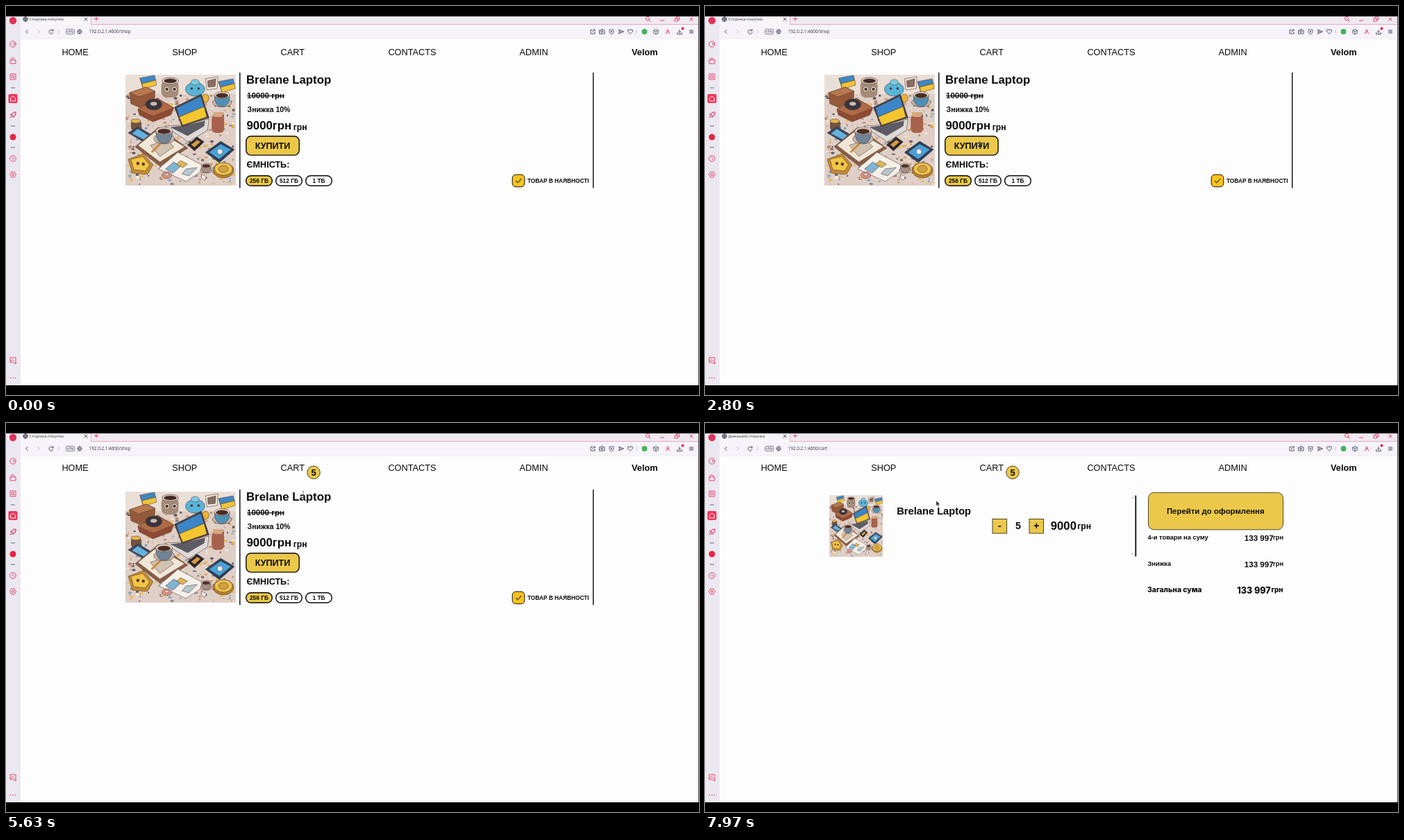
An HTML page that plays this animation: 998x561 px, repeating every 8000 ms.

```html
<!DOCTYPE html>
<html lang="uk">
<head>
<meta charset="utf-8">
<title>Shop</title>
<style>
  html, body { margin: 0; width: 100%; height: 100%; overflow: hidden; background: #000; }
  svg { display: block; width: 100vw; height: 100vh; }
  text { font-family: "Liberation Sans", Arial, sans-serif; fill: #0b0b0b; }
  .b { font-weight: 700; }
  .ui { font-family: "Open Sans", "Noto Sans", sans-serif; fill: #34343f; }
  .black { font-family: Inter, "Liberation Sans", sans-serif; font-weight: 800; }
  .mid { text-anchor: middle; }
  .red { stroke: #e0345a; fill: none; }
  .ink { stroke: #3f4257; fill: none; }
</style>
</head>
<body>
<svg id="stage" viewBox="0 0 998 561"></svg>
<script>
const LOOP = 8000;
const GOLD = '#ebc849';
const PRODUCT = 'Brelane Laptop';
const HOST = '192.0.2.1:4600';

const clicks = [2950, 3500, 4000, 4450, 4850];
const NAVIGATE = 6850, CART_SHOWN = 7000, LOADED = 7250;

// time, x, y
const path = [
  [1100, 470, 537], [1700, 440, 258], [2300, 396, 199], [4950, 396, 199],
  [5600, 428, 103], [5950, 428, 103], [6450, 421, 63], [7500, 421, 63], [7970, 333, 112]
];

const text = (x, y, size, str, cls = 'b', extra = '') =>
  `<text x="${x}" y="${y}" font-size="${size}" class="${cls}" ${extra}>${str}</text>`;
const rect = (x, y, w, h, fill, r = 0, stroke = 'none', sw = 1) =>
  `<rect x="${x}" y="${y}" width="${w}" height="${h}" rx="${r}" fill="${fill}" stroke="${stroke}" stroke-width="${sw}"/>`;
const circle = (x, y, r, fill, extra = '') => `<circle cx="${x}" cy="${y}" r="${r}" fill="${fill}" ${extra}/>`;
const oval = (x, y, rx, ry, fill) => `<ellipse cx="${x}" cy="${y}" rx="${rx}" ry="${ry}" fill="${fill}"/>`;
const poly = (points, fill) => `<polygon points="${points}" fill="${fill}"/>`;
const icon = (x, y, d, cls = 'ink', w = .9) =>
  `<path transform="translate(${x} ${y})" d="${d}" class="${cls}" stroke-width="${w}"/>`;
const ring = r => `M${-r} 0a${r} ${r} 0 1 0 ${2 * r} 0a${r} ${r} 0 1 0 ${-2 * r} 0`;
const box = r => `M${-r} ${-r}h${2 * r}v${2 * r}h${-2 * r}z`;
const CROSS = 'M-2.5 -2.5l5 5m0 -5l-5 5';
const GLOBE = ring(3.2) + 'M-3.2 0h6.4M0 -3.2q-3 3.2 0 6.4q3 -3.2 0 -6.4';

function clutter() {
  let seed = 11;
  const rnd = () => (seed = seed * 16807 % 2147483647) / 2147483647;
  const tones = ['#b98a6a', '#8a6a5c', '#d9a15e', '#7ea3bd', '#d8a49a', '#e8bd45', '#f2e6da', '#5c5560'];
  let out = '';
  for (let i = 0; i < 420; i++) {
    const y = 28 + rnd() * 130;
    out += oval((2 + rnd() * 156).toFixed(1), y.toFixed(1), (.8 + rnd() * 2).toFixed(1), (.7 + rnd() * 1.5).toFixed(1),
      tones[Math.floor(rnd() * tones.length)]);
  }
  return out;
}

const cup = (x, y, s, body) =>
  oval(x, y + s * .55, s * 1.25, s * .6, '#c5b8b0') +
  `<path d="M${x - s} ${y - s * .4}q0 ${s * 1.5} ${s} ${s * 1.5}q${s} 0 ${s} ${-s * 1.5}z" fill="${body}"/>` +
  oval(x, y - s * .4, s, s * .45, '#efe2d5') + oval(x, y - s * .35, s * .78, s * .3, '#4a2c22');

const flag = (x, y) =>
  `<path d="M${x} ${y + 2}l7 22" stroke="#8b6a50" stroke-width="1.2"/>` +
  poly(`${x},${y + 2} ${x + 21},${y - 2} ${x + 23},${y + 5} ${x + 3},${y + 10}`, '#3d87c4') +
  poly(`${x + 3},${y + 10} ${x + 23},${y + 5} ${x + 24},${y + 12} ${x + 5},${y + 18}`, '#f2c437');

const picture = `<symbol id="picture" viewBox="0 0 160 160" preserveAspectRatio="none">
  ${rect(0, 0, 160, 160, '#dfcfc7')}${rect(0, 0, 160, 28, '#eadfd6')}${clutter()}
  <g stroke="#5a4038" stroke-width=".6">
  ${flag(21, 3)}${flag(135, 8)}
  ${poly('6,26 30,18 43,24 42,38 20,47 8,42', '#94593a')}${poly('6,26 30,18 43,24 20,32', '#b8784d')}
  ${poly('18,50 46,34 70,48 66,58 40,68 20,58', '#8f4a32')}${poly('18,50 46,34 70,48 40,60', '#b06a46')}
  ${oval(41, 43, 12, 8, '#37343d')}${oval(41, 42, 5, 3, '#c9bdb0')}
  ${rect(52, 8, 25, 25, '#a58b78', 8)}${oval(65, 9, 12, 5, '#dccdbf')}${oval(65, 9, 9, 3, '#3f2a25')}
  ${circle(60, 21, 4, '#f0e2cf')}${circle(71, 21, 4, '#f0e2cf')}${circle(60, 21, 2, '#3a3437')}${circle(71, 21, 2, '#3a3437')}
  ${oval(101, 21, 14, 10, '#58b4d8')}${oval(101, 11, 6, 4, '#7bcbe6')}${circle(96, 20, 1.5, '#26343c')}${circle(106, 20, 1.5, '#26343c')}
  ${poly('116,6 134,3 133,20 118,22', '#efe8de')}${poly('119,9 131,6 130,17 120,18', '#876e60')}
  ${oval(116, 34, 5, 6, '#e8b437')}${cup(140, 34, 11, '#4f91b5')}
  ${rect(125, 58, 18, 26, '#a8614c', 6)}${rect(127, 54, 14, 7, '#d7a77d', 3)}
  ${rect(8, 66, 15, 15, '#715344', 5)}${oval(15, 67, 7, 3, '#e7b548')}
  ${poly('57,74 80,73 121,64 119,80 91,97', '#dedad8')}${poly('66,76 83,74 115,67 114,74 90,88', '#5c5c66')}
  ${poly('71,47 110,28 121,62 82,75', '#3a3b45')}${poly('74,48 109,31 114,46 78,61', '#3a86c8')}
  ${poly('78,61 114,46 118,61 83,73', '#f3c62f')}
  ${poly('4,84 18,75 40,88 28,98', '#33435c')}${poly('9,85 18,78 34,88 27,94', '#63b2df')}
  ${poly('14,104 48,76 90,106 50,132', '#8a5d43')}${poly('18,102 46,80 86,104 50,126', '#f1e7d8')}
  ${poly('36,102 60,94 70,104 50,118', '#d2c2b1')}<path d="M38 112l16 -16" stroke="#c98a3b" stroke-width="3"/>
  ${cup(56, 86, 12, '#6f8595')}
  ${poly('90,101 104,90 114,97 100,110', '#25252c')}${poly('95,101 104,94 109,97 100,105', '#d79843')}
  ${poly('116,112 138,96 158,108 136,127', '#29405c')}${poly('121,112 138,100 153,108 136,122', '#46a3dc')}${circle(137, 111, 4, '#e9edf0')}
  ${poly('48,136 76,112 118,134 88,154', '#f5f1ea')}${poly('58,136 70,126 80,132 69,142', '#7eb4d5')}
  ${poly('80,124 90,129 83,134 74,129', '#ddb554')}${poly('88,136 104,134 92,146 82,143', '#b7c6cf')}
  ${poly('4,122 26,114 40,130 32,144 10,142', '#c48b34')}${poly('8,122 25,118 35,130 29,139 12,137', '#f2c546')}
  ${circle(18, 128, 2, '#4d3324')}${circle(26, 129, 2, '#4d3324')}
  ${oval(60, 145, 7, 5, '#dd9089')}${oval(60, 144, 3, 2, '#f0d8cb')}
  ${cup(117, 134, 7, '#a59085')}${oval(142, 138, 15, 11, '#b57f2c')}${oval(142, 136, 13, 9, '#efc54b')}${oval(142, 136, 7, 5, '#d3a240')}
  ${poly('110,144 117,147 115,152 111,150', '#fff')}
  </g>
</symbol>`;

const sidebar = rect(0, 14, 21, 533, '#ebe8f1') +
  circle(10, 21, 5.2, '#e0345a') +
  icon(10, 55, ring(4.2) + 'M0 0l2 -2M0 0h4', 'red') +
  icon(10, 79, 'M-4 -1h8v5h-8zM-3 -1l1 -3h3l2 3', 'red') +
  icon(10, 102, box(4) + 'M-1.7 -1.7h3.4v3.4h-3.4z', 'red') +
  [118, 173, 204].map(y => icon(10, y, 'M-3 0h6', 'ink', .8)).join('') +
  rect(3.5, 127, 13, 13, '#ee3659', 2) +
  `<path d="M6.5 137v-4l3.500 -3l3.500 3v4z" fill="none" stroke="#fff" stroke-width=".9"/>` +
  icon(10, 157, 'M4 -4q-5 0 -6 5l1.500 1.500q5 -1 4.500 -6.500zM-2 -1l-2 1M1 2l-1 2M-4 4l1.500 -1.500', 'red', 1.1) +
  circle(10, 189, 4.5, '#e5253f') +
  icon(10, 220, ring(4.3) + 'M0 -2.500v2.500l2 1.500', 'red') +
  icon(10, 243, 'M-2 -4h4l2.500 4l-2.500 4h-4l-2.500 -4z' + ring(1.5), 'red') +
  icon(10, 511, 'M-4 -4h8v6M-4 -4v7h5M-4 2l3 -3l3 2M1 4h4m-2 -2l2 2l-2 1.500', 'red') +
  [6.5, 10, 13.5].map(x => circle(x, 536.5, .8, '#e0345a')).join('');

const browser = rect(0, 14, 998, 533, '#fdfdfd') +
  rect(21, 14, 977, 13, '#f0e9f1') + rect(21, 14, 101, 13, '#f8f5fa') + rect(21, 27, 977, 20, '#f6f3fa') +
  `<path d="M122.500 14v12.500H998M20.500 14v533" fill="none" stroke="#e59aad" stroke-width=".8"/>
   <path d="M21 47.300h977" stroke="#e7e3ec" stroke-width=".6"/>` + sidebar +
  icon(115, 19, CROSS) + icon(130, 18.5, 'M-3 0h6M0 -3v6', 'red') +
  icon(924, 18, ring(2.6) + 'M2 2l2.500 3', 'red') + icon(945, 21, 'M-3 0h6', 'red') +
  icon(966, 19, 'M-3 -1h4.500v4h-4.500zM-1 -1v-2h4.500v4h-2', 'red') + icon(987, 19, CROSS, 'red') +
  icon(30, 37, 'M1.500 -3l-3 3l3 3') + `<g opacity=".3">${icon(47, 37, 'M-1.500 -3l3 3l-3 3')}${icon(76, 37, 'M0 -2.500v5')}${icon(908, 37, 'M0 -2.500v5')}</g>` +
  rect(86.5, 33.5, 12, 7, 'none', 1, '#55586b', .7) + text(92.5, 39, 4.8, 'VPN', 'ui mid') +
  icon(106, 37, GLOBE, 'ink', .7) +
  icon(845, 37, 'M0 -2.500h-3v5.500h6v-3M-1 1l4 -4M1 -3h2v2') +
  icon(858, 37, 'M-3.500 -2h2l1 -1.500h2l.5 1.500h2v5h-7.500z' + ring(1.3)) +
  icon(872, 37, 'M-3 -3h6v4q-1 2 -3 3q-2 -1 -3 -3zM-1.300 -1.300l2.600 2.600m0 -2.600l-2.600 2.600', 'ink', .8) +
  icon(886, 37, 'M-3.500 -3l7 3l-7 3l1 -3zM-2.500 0h3') +
  icon(899, 37, 'M0 3.300l-3.300 -3.300q-1 -3 1.300 -3.200q1.500 0 2 1.400q.5 -1.400 2 -1.400q2.300 .2 1.300 3.200z') +
  circle(919.5, 37, 4, '#45b35d') +
  icon(936, 37, 'M0 -3.500l3.300 1.700v4l-3.300 1.600l-3.300 -1.600v-4zM-3.300 -1.800l3.300 1.700l3.300 -1.700M0 0v3.500', 'ink', .8) +
  icon(953, 37, 'M-1.400 -1.500a1.400 1.400 0 1 0 2.800 0a1.400 1.400 0 1 0 -2.800 0M-2.700 3.300q0 -3 2.700 -3q2.700 0 2.700 3', 'red') +
  icon(970, 37, 'M0 -3v4.500m-2 -2l2 2l2 -2M-3.300 1v2.500h6.600v-2.500') + circle(974.5, 32.5, 2, '#e8273f') +
  icon(987, 37, 'M-3 -2h6M-3 0h6M-3 2h6') +
  rect(997, 14, 1, 533, '#5a4750');

const nav = [[80.4, 'HOME'], [239.2, 'SHOP'], [395.6, 'CART'], [550.4, 'CONTACTS'], [739.5, 'ADMIN']]
  .map(([x, s]) => text(x, 70.6, 12.75, s, '')).join('') + text(901, 70.6, 12.75, 'Velom');

const pill = (x, label, fill) =>
  rect(x + .7, 244.7, 37.6, 14.6, fill, 7.3, '#0b0b0b', 1.4) + text(x + 19.5, 254.7, 8.4, label, 'b mid');
const rule = (x, y1, y2, w) => `<path d="M${x} ${y1}V${y2}" stroke="#0b0b0b" stroke-width="${w}"/>`;

const shop = `<use href="#picture" x="172" y="99" width="159" height="160"/>` +
  rule(336.8, 96, 262.5, 1.4) + rule(845.7, 96, 262.5, 1.4) +
  text(346, 112, 16.8, PRODUCT) +
  text(347, 133, 11.5, '10000 грн', 'b', 'text-decoration="line-through"') +
  text(347.6, 153, 10.5, 'Знижка 10%') +
  text(346.5, 178, 16.8, '9000грн') + text(413.7, 179, 12.2, 'грн') +
  rect(345.8, 187.7, 76.4, 27.4, GOLD, 7, '#0b0b0b', 1.4) + text(384, 206, 12.6, 'КУПИТИ', 'b mid') +
  text(346.6, 233, 12.6, 'ЄМНІСТЬ:') +
  pill(345, '256 ГБ', GOLD) + pill(388, '512 ГБ', '#fdfdfd') + pill(431, '1 ТБ', '#fdfdfd') +
  rect(729.2, 243.2, 17.6, 17.6, '#fcc419', 5, '#0b0b0b', 1) +
  icon(738, 252, 'M-4 0l2.800 2.800l5.500 -5.800', 'ink', 1.2) +
  text(751, 254.6, 8.3, 'ТОВАР В НАЯВНОСТІ');

const stepper = (x, s) => rect(x, 138.5, 20.6, 20.6, GOLD, 0, '#3a3420', .9) + text(x + 10.3, 153.3, 14, s, 'b mid');
const sumRow = (y, label) => text(637.4, y, 9.35, label) +
  text(776.8, y + 1.5, 11.6, '133 997') + text(818, y, 9.3, 'грн');

const cart = `<use href="#picture" x="179" y="104" width="77.500" height="89"/>` +
  text(276.2, 132, 14.7, PRODUCT) + stepper(414, '-') + text(451, 153.3, 14.4, '5', 'b mid') + stepper(467, '+') +
  text(497.8, 154, 16.7, '9000') + text(536.2, 153, 12.2, 'грн') +
  rule(620.3, 104.5, 192.5, 1.8) +
  `<path d="M614 108.500l1.800 -2l1.800 2M614 188l1.800 2l1.800 -2" fill="none" stroke="#aaa" stroke-width=".9"/>` +
  rect(638.5, 100.4, 194, 53.4, GOLD, 8, '#3a3420', .9) +
  text(735.3, 130.5, 11.4, 'Перейти до оформлення', 'b mid') +
  sumRow(168, '4-и товари на суму') + sumRow(206, 'Знижка') +
  text(637, 244, 10.4, 'Загальна сума', 'black') + text(766.3, 246, 12.5, '133 997', 'black') +
  text(815.5, 244, 9.7, 'грн', 'black');

const pointers = {
  arrow: '<path d="M0 0v7.500l1.800 -1.600l1.300 2.600l1.200 -.6l-1.200 -2.500h2.400z" fill="#22242b" stroke="#fff" stroke-width=".4"/>',
  hand: '<path d="M-1.500 -3.500q1 -1 1.600 0v2.500l3.400 .9v3l-1.300 2.600h-3.200l-2.800 -3.600q.4 -1.200 1.500 -.4l.8 .7z" fill="#2b3038" stroke="#d9dde2" stroke-width=".4"/>',
  beam: '<path d="M-1.500 -4.500h3M0 -4.500v9M-1.500 4.500h3" fill="none" stroke="#6d7480" stroke-width=".8"/>'
};

const $ = id => document.getElementById(id);
$('stage').innerHTML = `<defs>${picture}</defs>${browser}
  <g id="globe">${icon(28, 19, GLOBE, 'ink', 1)}</g>
  <g id="spinner"><path d="M28 16a3 3 0 1 1 -3 3" fill="none" stroke="#777a88" stroke-width=".8"/></g>
  ${text(33.6, 21.2, 5.85, '', 'ui', 'id="tab"')}
  <g id="reload">${icon(65, 37, 'M2.600 -1.500a3 3 0 1 0 .4 2.300M3 -3.500v2.300h-2.300')}</g>
  <g id="stop">${icon(65, 37, CROSS)}</g>
  ${text(119.6, 39.3, 6.35, '', 'ui', 'id="address"')}
  <g id="nav">${nav}</g><g id="shop">${shop}</g><g id="cart">${cart}</g>
  <g id="badge">${circle(443, 71.3, 9.3, GOLD, 'stroke="#3a3420" stroke-width=".9"')}${text(443, 76, 13, '', 'b mid', 'id="count"')}</g>
  <g id="pointer">${Object.entries(pointers).map(([k, v]) => `<g id="${k}">${v}</g>`).join('')}</g>
  ${rect(0, 0, 998, 15, '#000')}${rect(0, 547, 998, 14, '#000')}`;

const show = (id, on) => { $(id).style.display = on ? '' : 'none'; };

function pointerAt(t) {
  const i = path.findIndex(p => p[0] > t);
  if (i === 0) return null;
  if (i < 0) return path[path.length - 1].slice(1);
  const [t0, x0, y0] = path[i - 1], [t1, x1, y1] = path[i];
  const u = (t - t0) / (t1 - t0), e = u * u * (3 - 2 * u);
  return [x0 + (x1 - x0) * e, y0 + (y1 - y0) * e];
}

function pointerKind(x, y, inCart) {
  if (y < 72) return 'hand';
  if (inCart) return 'arrow';
  if (y > 187 && y < 216 && x > 345 && x < 423) return 'hand';
  return y > 96 && y < 116 ? 'beam' : 'arrow';
}

function render(t) {
  const count = clicks.filter(c => c <= t).length;
  const inCart = t >= CART_SHOWN, loading = t >= NAVIGATE && t < LOADED;
  show('shop', !inCart);
  show('cart', inCart);
  show('badge', count > 0);
  $('count').textContent = count || '';
  $('nav').setAttribute('transform', `translate(0 ${count ? -2 : 0})`);

  show('globe', !loading);
  show('spinner', loading);
  show('reload', !loading);
  show('stop', loading);
  $('spinner').setAttribute('transform', `rotate(${t * .36} 28 19)`);
  $('tab').textContent = t >= LOADED ? 'Домашня сторінка' : inCart ? HOST + '/cart' : 'Сторінка покупок';
  $('address').textContent = HOST + (t >= NAVIGATE ? '/cart' : '/shop');

  const at = pointerAt(t);
  show('pointer', at);
  if (at) {
    const kind = pointerKind(...at, inCart);
    Object.keys(pointers).forEach(k => show(k, k === kind));
    $('pointer').setAttribute('transform', `translate(${at[0]} ${at[1]})`);
  }
}

const start = performance.now();
function tick(now) {
  render(Math.max(0, now - start) % LOOP);
  requestAnimationFrame(tick);
}
render(0);
requestAnimationFrame(tick);
</script>
</body>
</html>
```
